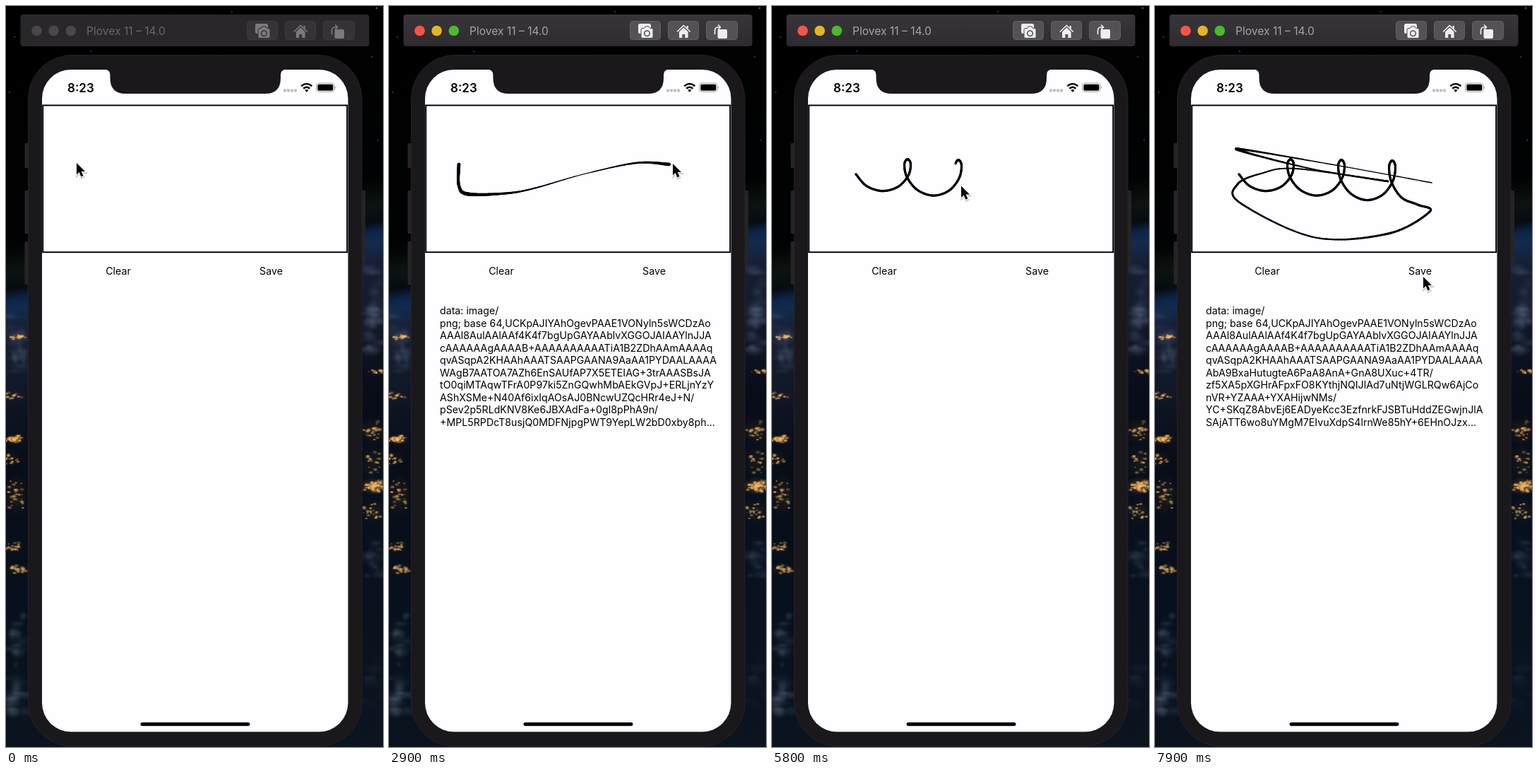
These frames come from a looping animation (534 px wide and 1048 px high, 8000 ms). An HTML page with a canvas:

```html
<!DOCTYPE html>
<html lang="en">
<head>
<meta charset="utf-8">
<title>Drawing pad</title>
<style>
  html, body { margin: 0; width: 534px; height: 1048px; overflow: hidden; background: #000; }
  canvas, svg { position: absolute; left: 0; top: 0; }
  text { font-family: Inter, Roboto, sans-serif; font-size: 14.2px; }
  #scene { --bar: #29272a; --barTop: #29272a; --btn: #353336; --edge: #3c3a3d; --icon: #7c7a7d; --title: #69676a;
           --c1: #49474a; --c2: #49474a; --c3: #49474a; }
  #scene.on { --bar: #2d2b2f; --barTop: #38363a; --btn: #545256; --edge: #626064; --icon: #eeedef; --title: #a5a3a7;
              --c1: #fb5347; --c2: #e5b523; --c3: #4aba2a; }
  .btn { fill: var(--btn); stroke: var(--edge); }
  .icon { fill: var(--icon); }
  .line { fill: none; stroke: var(--icon); stroke-width: 1.7; stroke-linecap: round; stroke-linejoin: round; }
</style>
</head>
<body>
<canvas id="sky" width="534" height="1048"></canvas>

<svg id="scene" width="534" height="1048" viewBox="0 0 534 1048">
  <defs>
    <linearGradient id="barFill" x2="0" y2="1">
      <stop style="stop-color:var(--barTop)"/>
      <stop offset="1" style="stop-color:var(--bar)"/>
    </linearGradient>
  </defs>

  <rect x="20.5" y="12" width="494" height="45" rx="4" fill="url(#barFill)"/>
  <circle cx="43.5" cy="35" r="7.3" fill="var(--c1)"/>
  <circle cx="67.6" cy="35" r="7.3" fill="var(--c2)"/>
  <circle cx="91.8" cy="35" r="7.3" fill="var(--c3)"/>
  <text x="114" y="41" style="font-size:15.6px" fill="var(--title)">Plovex 11 – 14.0</text>

  <rect class="btn" x="341.5" y="21.5" width="43" height="26" rx="4"/>
  <rect class="btn" x="395.5" y="21.5" width="43" height="26" rx="4"/>
  <rect class="btn" x="449.5" y="21.5" width="44" height="26" rx="4"/>

  <rect class="icon" x="353" y="25" width="18" height="14" rx="2.5"/>
  <path d="M357 33.5 q0 -2 2 -2 h2.5 l1.5 -2.5 h5 l1.5 2.5 h2.5 q2 0 2 2 v10 q0 2 -2 2 h-13 q-2 0 -2 -2 z"
        fill="var(--icon)" stroke="var(--btn)"/>
  <circle cx="365.5" cy="38.8" r="3.8" fill="none" stroke="var(--btn)" stroke-width="1.5"/>

  <path class="line" d="M408.5 36 l8.8 -8.5 l8.8 8.5"/>
  <path class="icon" d="M411 36.5 l6.3 -6 l6.3 6 v8.5 h-4.3 v-5 h-4 v5 h-4.3 z M421.5 28 h2.3 v4.5 l-2.3 -2 z"/>

  <rect class="icon" x="465.5" y="33" width="13.5" height="13" rx="2"/>
  <path class="line" d="M461.5 39.5 v-4.5 q0 -5 5 -5 h2.5 M466.5 27 l3 3 l-3 3"/>

  <g fill="#252427">
    <rect x="26.5" y="194" width="8" height="35" rx="1.5"/>
    <rect x="26.5" y="261" width="8" height="61" rx="1.5"/>
    <rect x="26.5" y="333" width="8" height="61" rx="1.5"/>
    <rect x="501" y="261" width="8" height="103" rx="1.5"/>
  </g>
  <rect x="31.5" y="69.5" width="472.5" height="977.5" rx="62" fill="#1a181b" stroke="#252326"/>
  <rect x="51" y="90" width="433.5" height="936.5" rx="41" fill="#fefdff"/>
  <path d="M140 89.5 h256 q-7 1 -7 8 v4.5 q0 22 -22 22 h-197.5 q-22 0 -22 -22 v-4.5 q0 -7 -7.5 -8 z" fill="#1a181b"/>

  <text x="87" y="121.5" style="font-size:17px;font-weight:600">8:23</text>
  <g fill="#bebdc1">
    <rect x="393" y="117.5" width="4" height="4" rx="1"/>
    <rect x="398" y="117.5" width="4" height="4" rx="1"/>
    <rect x="403" y="117.5" width="4" height="4" rx="1"/>
    <rect x="408" y="117.5" width="4" height="4" rx="1"/>
  </g>
  <path d="M418.3 113.3 q7.5 -6.6 15 0 M421.3 116.7 q4.5 -3.9 9 0" fill="none" stroke="#000" stroke-width="2.6"/>
  <path d="M425.8 122 l-2.5 -2.9 q2.5 -2 5 0 z"/>
  <rect x="439.5" y="109" width="25.5" height="12.5" rx="3.5" fill="none" stroke="#a3a2a5"/>
  <rect x="441.3" y="110.8" width="22" height="9" rx="2"/>
  <path d="M466 113.2 q2.2 2 0 4.2 z" fill="#a3a2a5"/>

  <rect x="52.2" y="140.5" width="431" height="207.7" fill="none" stroke="#050406" stroke-width="2"/>
  <text x="159" y="380" text-anchor="middle">Clear</text>
  <text x="375.5" y="380" text-anchor="middle">Save</text>
  <g id="output"></g>
  <rect x="190.5" y="1013.3" width="155" height="5" rx="2.5"/>
</svg>

<canvas id="ink" width="534" height="1048"></canvas>

<svg id="cursor" width="24" height="30" viewBox="-4 -4 24 30">
  <path d="M.5 1.5 v16.5 l3.7 -3.4 l2.7 6.3 l3 -1.3 l-2.7 -6 h5.3 z" fill="none" stroke="#0003" stroke-width="3"/>
  <path d="M0 0 v16.5 l3.7 -3.4 l2.7 6.3 l3 -1.3 l-2.7 -6 h5.3 z" stroke="#fff" stroke-width="2" paint-order="stroke"/>
</svg>

<script>
const LOOP = 8000, STEP = 100, LAG = 60;
const $ = id => document.getElementById(id);
const random = seed => () => (seed = seed * 16807 % 2147483647) / 2147483647;

function paintSky() {
  const g = $('sky').getContext('2d');
  const rnd = random(11);
  const spread = () => rnd() + rnd() - 1;
  const blob = (x, y, rx, ry, rgb, a) => {
    g.save();
    g.translate(x, y);
    g.scale(rx, ry);
    const f = g.createRadialGradient(0, 0, 0, 0, 0, 1);
    f.addColorStop(0, `rgba(${rgb},${a})`);
    f.addColorStop(1, `rgba(${rgb},0)`);
    g.fillStyle = f;
    g.fillRect(-1, -1, 2, 2);
    g.restore();
  };

  // The horizon climbs to the right, so the gradient is sheared.
  g.save();
  g.transform(1, -.187, 0, 1, 0, 0);
  const sky = g.createLinearGradient(0, 0, 0, 1150);
  [[0, '#000'], [340, '#010203'], [378, '#0d1311'], [402, '#070c12'], [417, '#0d2446'], [432, '#122b50'],
   [460, '#171f34'], [540, '#111828'], [640, '#080d18'], [820, '#07101c'], [1150, '#0c1420']]
    .forEach(([y, c]) => sky.addColorStop(y / 1150, c));
  g.fillStyle = sky;
  g.fillRect(0, 0, 534, 1160);
  g.restore();

  const cloud = (x, y, h, n, a) => {
    for (let i = 0; i < n; i++)
      blob(x + spread() * 18, y + spread() * h, 5 + rnd() * 14, 3 + rnd() * 8, '105,118,148', a * rnd());
  };
  cloud(15, 490, 55, 26, .22);
  cloud(520, 440, 75, 45, .3);
  cloud(15, 890, 45, 24, .25);
  cloud(15, 975, 35, 24, .3);
  cloud(520, 785, 40, 22, .28);
  cloud(520, 960, 60, 12, .14);

  const lights = (x, y, w, h, n) => {
    blob(x, y, w * 1.3, h * 1.3, '150,95,40', n / 150);
    for (let i = 0; i < n; i++) {
      const r = 1 + rnd() * 2;
      blob(x + spread() * w, y + spread() * h, r * 1.5, r, '248,186,95', .35 + rnd() * .6);
    }
  };
  lights(17, 468, 12, 4, 22);
  lights(12, 552, 14, 7, 12);
  lights(12, 613, 13, 6, 48);
  lights(8, 640, 12, 9, 18);
  lights(14, 692, 14, 24, 26);
  lights(10, 765, 13, 8, 16);
  lights(16, 797, 14, 7, 22);
  lights(525, 518, 14, 4, 16);
  lights(520, 601, 16, 15, 24);
  lights(520, 645, 15, 20, 18);
  lights(521, 679, 17, 10, 75);
  lights(520, 715, 15, 14, 22);

  [[525, 3], [320, 8], [5, 122], [518, 72], [120, 64], [12, 44], [527, 190]].forEach(([x, y], i) =>
    blob(x, y, 1.8, 1.8, '110,150,235', i ? .5 : 1));
}

// Stroke keys: time, x, y, pen width.
const first = [
  [1700, 99, 224, 4.5], [1900, 99, 254, 4], [2000, 112, 266, 5], [2150, 165, 265, 3], [2250, 205, 258, 2],
  [2400, 275, 238, 1], [2550, 350, 222, 2.5], [2700, 397, 224, 4.5]
];
const coil = Array.from({ length: 27 }, (_, i) => {
  const u = i / 26, a = Math.PI * (1 - i / 4);
  return [5200 + 950 * u, 138 + 234 * u + 19 * Math.cos(a), 238 + 12 * u + (22 + 9 * u) * Math.sin(a), 3.2];
});
const second = [
  ...coil,
  [6220, 389, 291, 3], [6300, 330, 322, 3], [6400, 225, 327, 2.2], [6540, 120, 278, 2.6], [6600, 117, 252, 3],
  [6680, 150, 237, 2], [6760, 200, 230, 1.8], [6880, 330, 248, 2.6], [6960, 220, 230, 1.8], [7040, 115, 202, 3.6],
  [7120, 250, 224, 1.3], [7200, 392, 250, 1.5]
];
// Strokes stay on the pad until the given time.
const strokes = [{ keys: first, until: 4200 }, { keys: second, until: LOOP }];

// Pointer rests and travels between strokes.
const moves = [
  [0, 100, 222], [1600, 100, 222], [1700, 99, 224], [2700, 397, 224], [2800, 402, 223], [3000, 402, 223],
  [3800, 162, 363], [4200, 162, 363], [4900, 122, 252], [5100, 122, 252], [5200, 119, 238],
  [7200, 392, 250], [7300, 392, 252], [7800, 380, 383], [LOOP, 380, 383]
];

const start = s => s.keys[0][0];
const end = s => s.keys[s.keys.length - 1][0];
const segment = (keys, t) => Math.max(0, Math.min(keys.length - 2, keys.findIndex(k => k[0] > t) - 1));

function pen(keys, t) {
  if (t >= keys[keys.length - 1][0]) return keys[keys.length - 1].slice(1);
  const i = segment(keys, t), b = keys[i], c = keys[i + 1];
  const a = keys[i - 1] || b, d = keys[i + 2] || c;
  const u = (t - b[0]) / (c[0] - b[0]);
  const spline = n => b[n] + u / 2 * (c[n] - a[n]
    + u * (2 * a[n] - 5 * b[n] + 4 * c[n] - d[n] + u * (3 * (b[n] - c[n]) + d[n] - a[n])));
  return [spline(1), spline(2), b[3] + (c[3] - b[3]) * u];
}

function pointer(t) {
  const s = strokes.find(s => t >= start(s) && t <= end(s));
  if (s) return pen(s.keys, t);
  const i = segment(moves, t), [t0, x0, y0] = moves[i], [t1, x1, y1] = moves[i + 1];
  const u = (t - t0) / (t1 - t0), e = u * u * (3 - 2 * u);
  return [x0 + (x1 - x0) * e, y0 + (y1 - y0) * e];
}

const ink = $('ink').getContext('2d');
ink.lineCap = 'round';
ink.font = '14.2px Inter, Roboto, sans-serif';

function drawInk(t) {
  ink.clearRect(0, 0, 534, 1048);
  for (const s of strokes) {
    if (t < start(s) + LAG || t >= s.until) continue;
    const stop = Math.min(t - LAG, end(s));
    let [x, y] = pen(s.keys, start(s));
    for (let k = start(s); k <= stop; k += 4) {
      const [nx, ny, w] = pen(s.keys, k);
      ink.lineWidth = w;
      ink.beginPath();
      ink.moveTo(x, y);
      ink.lineTo(nx, ny);
      ink.stroke();
      [x, y] = [nx, ny];
    }
  }
}

// Random letters fill each line up to its width; aShare sets how often "A" comes.
function fillLine(rnd, width, aShare, lead = '', tail = '') {
  const pick = (from, n) => String.fromCharCode(from.charCodeAt(0) + Math.floor(rnd() * n));
  let line = lead;
  while (ink.measureText(line + tail).width < width - 5) {
    const r = rnd();
    line += rnd() < aShare ? 'A' : r < .45 ? pick('A', 26) : r < .83 ? pick('a', 26) : r < .97 ? pick('0', 10) : '+';
  }
  return line + tail;
}

function message(seed, widths) {
  const top = random(5), rest = random(seed);
  return [
    'data: image/',
    fillLine(top, 385, .3, 'png; base 64,'),
    fillLine(top, 383, .25),
    ...[391, 390].map(w => fillLine(top, w, .65)),
    ...widths.map((w, i) => fillLine(rest, w, i ? .08 : .3, '', i === 4 ? '...' : w < 370 ? '/' : ''))
  ];
}
const texts = [[], message(21, [385, 391, 363, 310, 389]), message(47, [324, 385, 190, 388, 383])];
const textAt = t => t >= 7300 ? 2 : t >= 2800 && t < 4200 ? 1 : 0;

let shownText = 0;
function showText(n) {
  if (n === shownText) return;
  shownText = n;
  $('output').replaceChildren(...texts[n].map((line, i) => {
    const el = document.createElementNS('http://www.w3.org/2000/svg', 'text');
    el.setAttribute('x', 72);
    el.setAttribute('y', 436.3 + i * 17.52);
    el.textContent = line;
    return el;
  }));
}

function render(t) {
  $('scene').classList.toggle('on', t >= 1700);
  showText(textAt(t));
  drawInk(t);
  const [x, y] = pointer(t);
  $('cursor').style.transform = `translate(${x - 4}px, ${y - 4}px)`;
}

paintSky();
const begin = performance.now();
let last = -1;
function tick() {
  const t = Math.floor((performance.now() - begin) % LOOP / STEP) * STEP;
  if (t !== last) render(last = t);
  requestAnimationFrame(tick);
}
tick();
</script>
</body>
</html>
```
